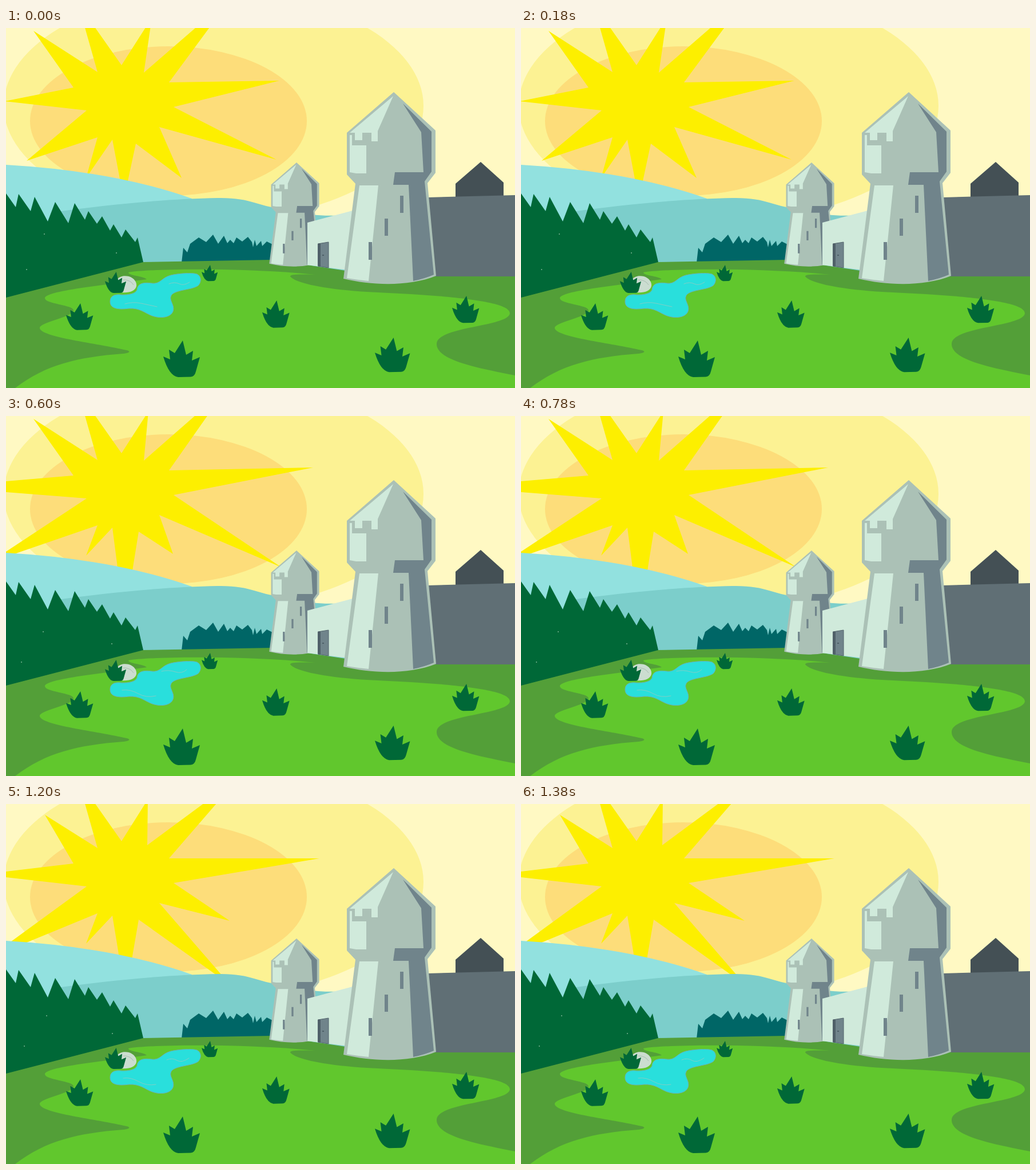
An HTML page that plays this animation: 890x629 px, repeating every 1500 ms.

```html
<!DOCTYPE html>
<html lang="en">
<head>
<meta charset="utf-8">
<title>Sunny castle meadow</title>
<style>
  html, body { margin: 0; width: 100%; height: 100%; overflow: hidden; }
  svg { display: block; width: 100vw; height: 100vh; }

  /* Five poses share one 1.5 s loop; each is held for a fifth of it. */
  .pose > * { visibility: hidden; animation: hold 1.5s step-end infinite; }
  .pose > :nth-child(1) { animation-delay: 0s; }
  .pose > :nth-child(2) { animation-delay: -1.2s; }
  .pose > :nth-child(3) { animation-delay: -.9s; }
  .pose > :nth-child(4) { animation-delay: -.6s; }
  .pose > :nth-child(5) { animation-delay: -.3s; }
  @keyframes hold {
    0% { visibility: visible; }
    20%, 100% { visibility: hidden; }
  }

  .sun { fill: #fdef00; }
  .pale { fill: #d0eadb; }
  .stone { fill: #abc1b6; }
  .shade { fill: #70848b; }
  .bush { fill: #006837; }
  .glint { fill: none; stroke: #e4f4e4; stroke-width: 1.4; stroke-linecap: round; }
  .ripple { fill: none; stroke: #80cfc6; stroke-width: 1; stroke-linecap: round; }
</style>
</head>
<body>
<svg viewBox="0 0 890 629" preserveAspectRatio="none">
  <defs>
    <path id="bush" d="M34 0L40 25L52 18L50 35L64 29L57 54Q55 63 48 63.500L26 64Q10 62 0 28L12 33L10 16L20 22Z"/>
    <g id="tower">
      <path class="stone" d="M678 112L751 179V253L737 271L752 433C705 452 640 450 590 438L611 272L596 256V183Z"/>
      <path class="pale" d="M677 119L650 180V198H639V183H623V196H610V183H601ZM601 187H605V205H630V254H612L601 252ZM618 275H651L634 442Q614 440 596 437Z"/>
      <path class="shade" d="M694 132L744 181V251L732 268L748 431Q732 438 712 442L704 274H677L680 252H730L726 182ZM689 293h6v30h-6ZM662 333h6v30h-6ZM634 374h6v31h-6Z"/>
    </g>
  </defs>

  <!-- sky -->
  <path fill="#fff9c3" d="M0 0H890V629H0Z"/>
  <ellipse cx="363" cy="136" rx="367" ry="200" fill="#fcf293"/>
  <ellipse cx="284" cy="162.500" rx="242" ry="130.500" fill="#fddd7a"/>

  <g class="sun pose">
    <path d="M118 104L48 5L160 77L126 -43L202 65L255 -18L241 78L398 -58L285 95L478 92L293 138L473 230L268 173L307 262L227 202L206 300L186 195L140 262L160 191L36 232L141 144L-2 128Z"/>
    <path d="M118 104L48 5L160 77L126 -43L202 65L249 -8L241 78L400 -57L285 95L508 92L293 138L481 264L268 173L307 262L227 202L206 367L186 195L140 244L160 191L36 232L141 144L-42 128Z"/>
    <path d="M118 104L48 5L160 77L126 -43L202 65L249 -8L241 78L387 -50L285 95L537 90L293 138L481 264L268 173L292 241L232 202L207 357L186 195L140 244L160 191L-29 256L141 144L-117 124Z"/>
    <path d="M118 104L48 5L160 77L126 -43L202 65L249 -8L241 78L376 -52L285 95L484 92L293 138L420 234L268 173L323 281L232 202L210 300L186 195L140 244L160 191L9 236L141 144L-32 123Z"/>
    <path d="M118 104L68 19L160 77L126 -43L202 65L248 -8L247 72L408 -47L285 95L548 95L293 138L391 204L268 173L392 316L232 202L209 335L186 195L140 244L160 191L-32 270L141 144L-43 123Z"/>
  </g>

  <!-- hills and woods -->
  <path fill="#92e1df" d="M0 239Q190 250 325 298V420H0Z"/>
  <path fill="#7ccecb" d="M90 321C180 308 290 298 370 297C430 296 440 312 480 315C510 322 545 333 610 325V430H90Z"/>
  <path fill="#006666" d="M307 410L310 384L317 392L322 377L337 366L350 374L362 361L371 377L381 363L387 376L392 370L398 376L403 366L413 373L423 365L430 374L432 383L435 370L438 381L446 372L448 381L456 373L466 378V408Z"/>
  <path fill="#539f38" d="M0 468L238 409L465 405L600 425H890V629H0Z"/>
  <path class="bush" d="M0 289L17 313L22 290L43 320L50 295L73 338L86 304L109 341L120 306L138 335L144 320L159 342L168 329L182 354L188 343L202 366L209 352L226 374L230 366L240 409L0 471Z"/>
  <g class="glint pose">
    <path d="M67 360h.1M193 393h.1M36 422h.1"/>
    <path d="M69 374h.1M202 391h.1M31 406h.1"/>
    <path d="M65 377h.1M185 398h.1M27 430h.1"/>
    <path d="M56 365h.1M201 403h.1M33 425h.1"/>
    <path d="M71 370h.1M186 401h.1M32 423h.1"/>
  </g>

  <!-- meadow -->
  <path fill="#61c72d" d="M16 629C70 588 125 575 205 569C216 568 219 565 211 563C160 551 59 540 59 524C59 514 118 505 118 493C118 484 68 482 68 472C68 458 195 447 246 439C240 433 214 433 214 427C250 420 430 419 540 431C515 430 497 430 497 434C503 443 545 457 650 462C760 467 881 476 881 498C881 522 753 521 753 552C753 580 820 593 890 607V629Z"/>

  <!-- castle -->
  <use href="#tower" transform="translate(508 235) scale(.542) translate(-678 -112)"/>
  <path class="pale" d="M527 340L610 318L597 423L527 414Z"/>
  <path class="shade" d="M545 377L564 374V419L545 416Z"/>
  <path fill="#4f6068" d="M545 377L550 376V417L545 416ZM553 396h3v2h-3Z"/>
  <path fill="none" stroke="#54656c" d="M545.500 377L564 374V419L545.500 416Z"/>
  <path fill="#445055" d="M786 296V272L830 234L870 270V296Z"/>
  <path fill="#606f75" d="M737 296L890 292V434H748Z"/>
  <use href="#tower"/>

  <!-- pond -->
  <path fill="#cbddd0" d="M192 443C196 433 207 432 215 434C224 437 229 444 228 451C226 460 215 463 202 462Z"/>
  <path fill="none" stroke="#a9beb2" d="M205 440Q218 440 223 449"/>
  <path fill="#29dfdc" stroke="#6bb0b8" d="M182 478C182 468 190 465 200 466C215 467 226 464 229 458C230 446 240 444 255 446C270 448 272 436 288 432C300 429 325 427 334 430C342 434 342 444 336 450C325 458 296 457 289 467C284 476 296 484 292 495C288 506 270 508 256 503C242 498 235 489 215 490C200 492 182 492 182 478Z"/>
  <g class="ripple pose">
    <path d="M285 447q10 -4 18 0t18 -3M208 482q14 -4 28 -1t28 6"/>
    <path d="M283 448q8 -4 17 0q12 4 18 -5M206 485q14 -5 30 -3t28 10"/>
    <path d="M272 446q12 -3 24 1t20 -4M203 479q14 -2 28 6t31 4"/>
    <path d="M282 446q9 -3 18 2t20 -4M205 482q12 2 29 1t30 8"/>
    <path d="M281 447q10 -4 18 1t21 -4M205 479q13 -2 27 6t30 5"/>
  </g>

  <g class="bush">
    <use href="#bush" transform="translate(105 481) scale(.74 .73)"/>
    <use href="#bush" transform="translate(173 426) scale(.58)"/>
    <use href="#bush" transform="translate(342 414) scale(.44)"/>
    <use href="#bush" transform="translate(448 476) scale(.745)"/>
    <use href="#bush" transform="translate(780 468) scale(.74)"/>
    <use href="#bush" transform="translate(645 541) scale(.96 .94)"/>
    <use href="#bush" transform="translate(275 546)"/>
  </g>
</svg>
</body>
</html>
```
